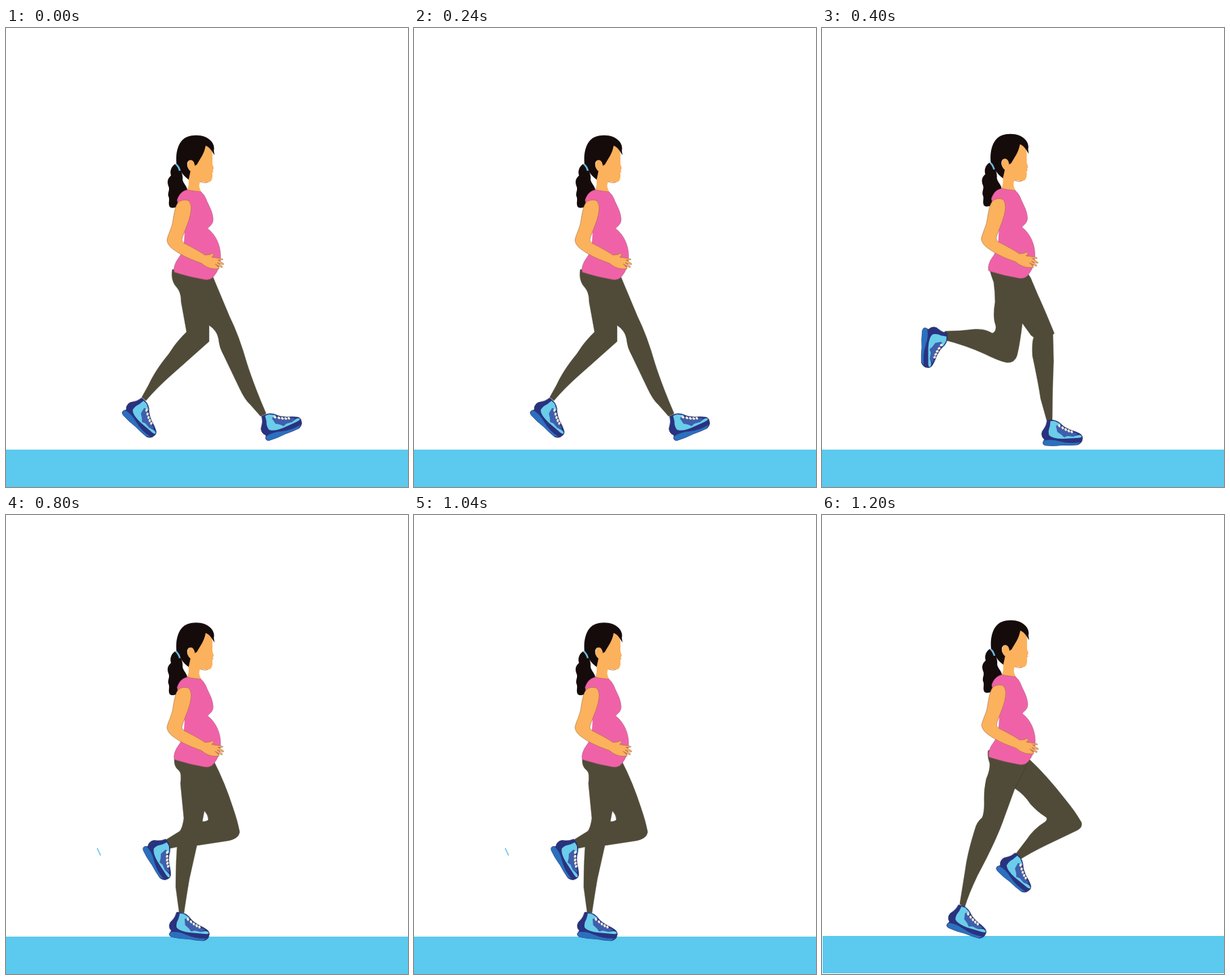
An HTML page that plays this animation: 592 by 675 pixels, repeating every 1.6 s.

```html
<!DOCTYPE html>
<html lang="en">
<head>
<meta charset="utf-8">
<title>Walk cycle</title>
<style>
html, body { margin: 0; width: 100%; height: 100%; overflow: hidden; background: #fff; }
svg { display: block; width: 100%; height: 100%; }
</style>
</head>
<body>
<svg viewBox="0 0 592 675">
  <defs>
    <!-- Side view, origin at the back of the sole -->
    <g id="shoe">
      <path fill="#29327f" stroke="#222b5c" stroke-width=".6" d="M6-35Q10-36 17-35Q21-34 25-31Q30-25 40-21Q50-18 55-15Q59-12 58-8Q58-2 51 1Q40 2 29 1.500Q16 3 4 2Q-1 1 0-3L2-7Q-2-10-2-15Q-2-19 1-22Q5-27 6-35Z"/>
      <path fill="#2b70bf" d="M1-5Q12-8 25-4Q40 0 55-3L50 1Q40 2 29 1.500Q16 3 4 2Q-1 1 1-5Z"/>
      <path fill="#6acdea" d="M11-34L17-34L25-30L28-23L38-13L47-12Q54-15 57-12Q58-9 48-9L29-8Q14-8 9-13Q7-19 10-26Z"/>
      <path fill="#3f5fae" d="M19-27L24-29Q32-22 45-18L51-15L45-11L36-12L31-10L27-14L21-18Z"/>
      <path fill="none" stroke="#29327f" stroke-width="1.5" d="M24-28Q33-21 46-17"/>
      <path fill="none" stroke="#f4efd7" stroke-width="3.2" stroke-linecap="round" d="M23.5-27.5l.8 1M28.5-24.5l.8 1M33-22l.8 1M37.5-20l.8 1M42-18.5l.6.8"/>
    </g>
  </defs>
  <rect width="592" height="675" fill="#fff"/>
  <rect id="floor" width="592" height="55" fill="#5cc9ee"/>
  <path id="legs" fill="#504b38" fill-rule="evenodd" stroke="#454130" stroke-width=".5"/>
  <path id="mark" fill="none" stroke-linecap="round"/>
  <use id="back" href="#shoe"/>
  <use id="front" href="#shoe"/>
  <g id="body" stroke-linejoin="round">
    <path fill="#150b0a" d="M249 200C243 204 241 211 243 217C238 221 237 226 239 232C242 238 238 241 239 247C242 253 238 257 241 263C245 266 250 264 253 262C253 255 255 250 259 246L267 238C266 231 260 228 260 222C261 214 256 205 249 200Z"/>
    <path fill="#fcb15d" d="M292 172C300 173 305 181 304 189L304 200L306 206L304 211L304 219C303 226 300 227 296 227L286 226C283 232 285 237 289 243C282 251 270 247 266 240C269 233 270 228 268 219L272 190Z"/>
    <path fill="none" stroke="#a96f3a" stroke-width=".7" d="M303.500 211h2M286 226Q292 229 297 227"/>
    <path fill="#150b0a" d="M251 200C249 179 256 164 267 160C275 157 285 157 293 160C303 164 308 173 306 180L307 187C303 181 300 175 294 173C292 185 286 192 281 201L277 203C276 195 270 191 267 198C266 205 269 207 272 209L269 223C262 218 257 212 254 203Z"/>
    <path fill="#fcb15d" d="M268 197C271 192 277 194 278 202L274 213L269 208Q266 203 268 197Z"/>
    <path fill="none" stroke="#69bde4" stroke-width="2.600" d="M250 200Q254 203 256 210"/>
    <path fill="#f062a7" stroke="#a8557e" stroke-width=".6" d="M252 253C255 244 260 239 268 238C274 240 282 240 287 241Q291 244 294 250C298 261 304 268 305 281C305 290 299 291 297 295C309 304 316 320 316 335C316 350 311 359 306 365Q302 371 293 370Q269 366 248 359Q246 353 251 343L257 334L262 316L261 306L256 270Z"/>
    <path fill="#fff" d="M263 300L260 306Q258 310 260 314L262 316Z"/>
    <path fill="#fcb15d" stroke="#9a7046" stroke-width=".6" d="M254 256Q261 251 269 254Q274 260 272 271C270 285 262 299 259 311Q259 315 263 317C275 323 286 329 293 334Q301 334 305 331Q307 333 303 337L317 339Q321 340 319 341L312 341L320 346Q322 348 319 348L311 345L318 350Q320 353 317 352L308 347L312 351Q316 355 312 354C303 355 295 352 288 346C274 341 259 335 247 326Q238 320 237 312C239 302 245 293 246 282C248 271 249 262 254 256Z"/>
  </g>
</svg>
<script>
const STEP = 400;
const el = id => document.getElementById(id);

// Shoes: [x, y, angle]; body and floor: [x, y]
const poses = [
  {
    body: [0, 0], floor: [0, 620],
    back: [171, 565, 44], front: [383.5, 606, -21],
    legs: "M245 355Q242 372 252 382Q258 389 258 403L266 447Q250 462 240 479Q220 503 210 525L200 543L206 548Q222 529 246 508L299 461V437Q311 445 313 457Q314 470 321 482Q333 507 344 530Q352 547 360 554L375 571L383 567Q366 528 355 494Q343 452 329 424L303 362Z"
  },
  {
    body: [-2.5, -2], floor: [0, 620],
    back: [150, 441, 93], front: [325.5, 612, 0],
    legs: "M247 355Q249 364 253 374Q255 388 255 403Q251 425 256 438Q257 446 251 449Q240 442 225 443Q203 446 181 446L178 458Q213 467 239 479Q261 490 273 492Q284 492 287 482Q291 467 295 434L308 452L312 455Q309 460 310 482Q319 524 322 545L331 577H339Q339 533 341 490L340 451L342 449Q326 410 318 393L307 367L300 357Z"
  },
  {
    body: [0, .5], floor: [0, 620],
    back: [202, 489, 60], front: [240.5, 618, 8],
    legs: "M248 359Q247 370 255 376Q259 380 257 395L262 446Q260 460 256 465L235 478L238 491L252 488Q250 515 250 547L255 584L262 585Q266 558 270 535L281 486L327 479Q343 476 344 466Q341 450 334 430Q322 393 306 362ZM292 435Q298 441 298 448Q296 451 289 451Z",
    mark: ["M134.500 490.500L139 500", "#7fcbea", 1.8]
  },
  {
    body: [-2, -3], floor: [1, 619],
    back: [256.5, 519, 42], front: [183.5, 604, 20],
    legs: "M245 346Q243 354 247 365Q248 374 242 388Q238 405 239 424Q239 438 236 445Q228 451 225 463Q214 498 211 522L203 572L210 577Q216 557 229 530Q258 476 269 443L284 402Q298 411 307 425Q318 437 328 443Q334 446 329 451Q311 462 301 478L284 500L289 508Q308 496 331 485L375 464Q384 460 382 452Q373 436 358 418Q330 382 304 358Z",
    mark: ["M304 362Q290 391 284 402", "#3d3a2b", .6]
  }
];

const place = (id, [x, y, angle = 0]) =>
  el(id).setAttribute("transform", `translate(${x} ${y}) rotate(${angle})`);

let shown = -1;

function draw(time) {
  const i = Math.floor(time / STEP) % poses.length;
  if (i === shown) return;
  shown = i;
  const pose = poses[i];
  for (const id of ["body", "floor", "back", "front"]) place(id, pose[id]);
  el("legs").setAttribute("d", pose.legs);
  const [d, color, width] = pose.mark || ["", "none", 0];
  el("mark").setAttribute("d", d);
  el("mark").setAttribute("stroke", color);
  el("mark").setAttribute("stroke-width", width);
}

const start = performance.now();
function tick() {
  draw(performance.now() - start);
  requestAnimationFrame(tick);
}
tick();
</script>
</body>
</html>
```
